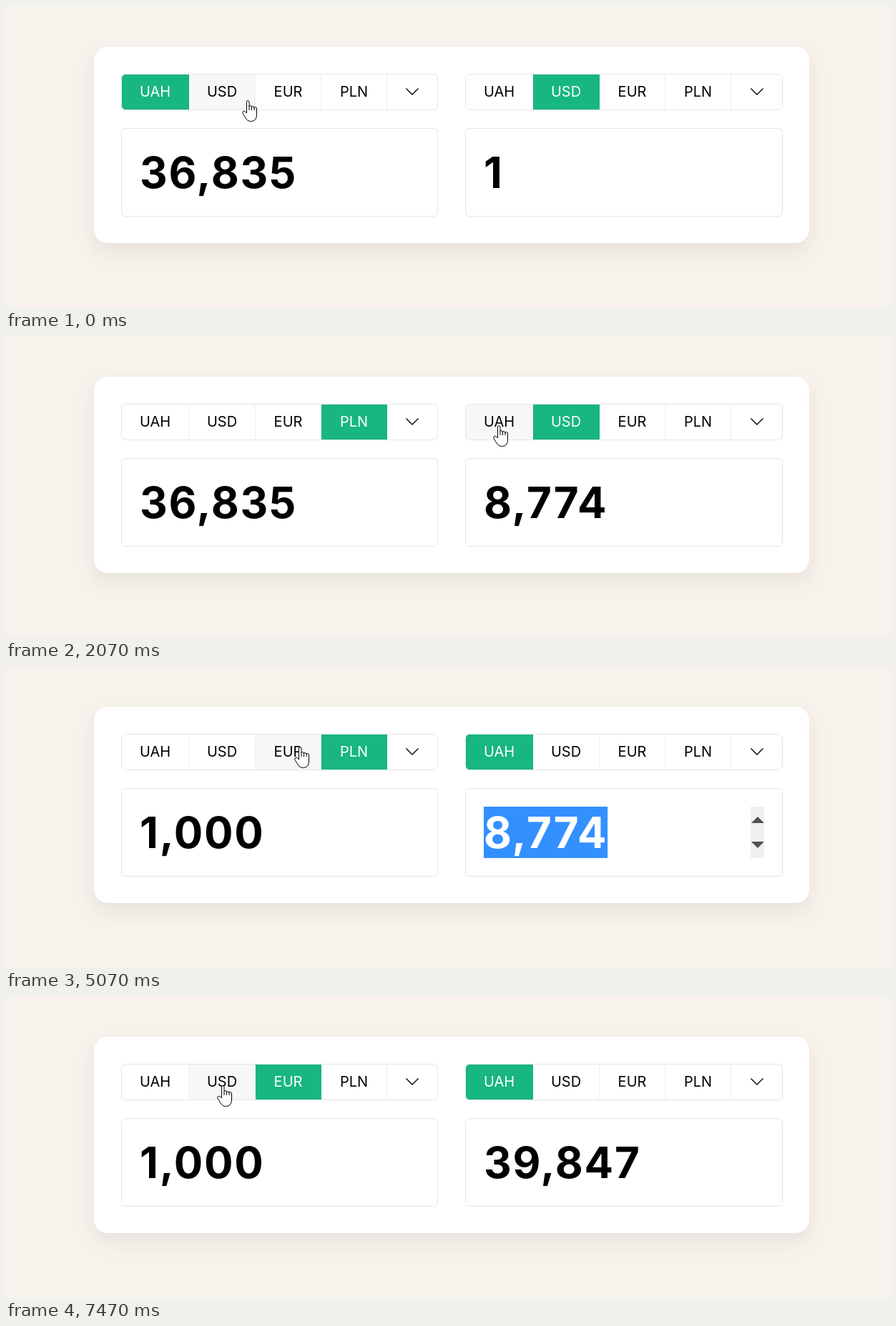
These frames come from a looping animation (1236 px wide and 423 px high, 8 s). An HTML page with a canvas:

```html
<!DOCTYPE html>
<html lang="en">
<head>
<meta charset="utf-8">
<title>Currency converter</title>
<style>
html, body { margin: 0; width: 100%; height: 100%; overflow: hidden; background: #f7f2ec; }
canvas { display: block; }
</style>
</head>
<body>
<canvas id="stage" width="1236" height="423"></canvas>
<script>
const ctx = document.getElementById('stage').getContext('2d');
const LOOP = 8000, TICK = 200 / 3;
const GREEN = '#18b681', LINE = '#e5e5e5', DIVIDER = '#efefef';
const CODES = ['UAH', 'USD', 'EUR', 'PLN'];
const RATES = [1, 36.8355, 39.8469, 8.774];
const CELLS = [94, 93, 92, 92];
const PANELS = [{ x: 161, w: 443 }, { x: 642, w: 444 }];
const BAR = { y: 95, h: 51 }, FIELD = { y: 171, h: 124 };
const DRAG = { from: 4270, to: 6270 };

const CLICKS = [
  { at: 330, panel: 0, code: 1 },
  { at: 930, panel: 0, code: 2 },
  { at: 1400, panel: 0, code: 3 },
  { at: 2130, panel: 1, code: 0 },
  { at: 6270, panel: 0, code: 2 }
];

// pointer moves: start, end, goal x, goal y, downward bow
const START = { x: 337, y: 133 };
const MOVES = [
  [0, 870, 408, 137], [870, 1070, 460, 141], [1070, 1730, 496, 138], [1730, 2070, 688, 126],
  [2070, 2670, 250, 154, 80], [2870, 3270, 794, 242, 40], [3530, 3730, 886, 237],
  [3800, 4000, 886, 235], [4210, 5070, 410, 114], [5200, 5470, 358, 129], [5470, 5800, 428, 114],
  [6000, 6070, 425, 114], [6600, 6930, 289, 140], [6930, 7130, 302, 126]
];

const HAND = new Path2D('M6.5 18V3Q6.5 .5 8.2 .5T10 3V8.5Q10 7.5 11.7 7.5T13.5 10Q13.5 8.5 15.2 8.5T17 11' +
  'Q17 9.5 18.7 9.5T20.5 12V20Q20.5 29.5 12.5 29.5Q7.5 29.5 5 25L1 18.5Q0 15.5 2.5 15.2Q4.5 15.2 6.5 18Z' +
  'M10 8V14M13.5 9V14M17 10V14');
const ARROW = new Path2D('M.5 .5V16.5L4.3 12.9 6.7 18.5 9 17.5 6.6 12H11.8Z');

function pointerAt(t) {
  let { x, y } = START;
  for (const [from, to, goalX, goalY, bow = 0] of MOVES) {
    const u = Math.min(Math.max((t - from) / (to - from), 0), 1);
    const eased = u * u * (3 - 2 * u);
    x += (goalX - x) * eased;
    y += (goalY - y) * eased + bow * Math.sin(Math.PI * u);
  }
  return { x: Math.round(x), y: Math.round(y) };
}

// each click converts the amount of the clicked side into the other, or back
function stateAt(t) {
  const codes = [0, 1], amounts = [36835, 1];
  for (const { at, panel, code } of CLICKS) {
    if (at > t) break;
    codes[panel] = code;
    const from = panel, to = 1 - panel;
    const [source, result] = panel ? [to, from].reverse() : [from, to];
    amounts[result] = Math.round(amounts[source] * RATES[codes[source]] / RATES[codes[result]]);
  }
  return { codes, amounts: amounts.map(n => n.toLocaleString('en-US')) };
}

const inside = (p, panel, row) =>
  p.x >= panel.x && p.x < panel.x + panel.w && p.y >= row.y && p.y < row.y + row.h;

function rect(color, x, y, w, h) {
  ctx.fillStyle = color;
  ctx.fillRect(x, y, w, h);
}

function shape(draw, color, points) {
  ctx.beginPath();
  points.forEach(([x, y]) => ctx.lineTo(x, y));
  ctx[draw + 'Style'] = color;
  ctx[draw]();
}

function text(str, x, y, color) {
  ctx.fillStyle = color;
  ctx.fillText(str, x, y);
}

function box(panel, row) {
  ctx.beginPath();
  ctx.roundRect(panel.x + .5, row.y + .5, panel.w - 1, row.h - 1, 5.5);
}

function drawCard() {
  rect('#f7f2ec', 0, 0, 1236, 423);
  ctx.save();
  ctx.shadowColor = 'rgba(70,40,40,.08)';
  ctx.shadowBlur = 28;
  ctx.shadowOffsetY = 12;
  ctx.fillStyle = '#fff';
  ctx.beginPath();
  ctx.roundRect(123, 57, 1000, 275, 19);
  ctx.fill();
  ctx.restore();
}

function drawBar(panel, chosen, pointer) {
  const over = inside(pointer, panel, BAR);
  const end = panel.x + panel.w - 1;
  let x = panel.x + 1;
  const hover = w => {
    if (over && pointer.x >= x && pointer.x < x + w) rect('#f7f7f7', x, 96, w, 49);
  };
  ctx.save();
  box(panel, BAR);
  ctx.clip();
  ctx.font = '400 20px Inter, sans-serif';
  ctx.letterSpacing = '0px';
  ctx.textAlign = 'center';
  CELLS.forEach((w, i) => {
    hover(w);
    rect(DIVIDER, x + w - 1, 96, 1, 49);
    if (i === chosen) rect(GREEN, x, 96, w, 49);
    text(CODES[i], x + (w - 1) / 2, 127, i === chosen ? '#fff' : '#000');
    x += w;
  });
  hover(end - x);
  ctx.restore();

  ctx.strokeStyle = LINE;
  box(panel, BAR);
  ctx.stroke();
  const mid = end - 35;
  ctx.lineWidth = 1.4;
  shape('stroke', '#000', [[mid - 8.5, 115.5], [mid, 124], [mid + 8.5, 115.5]]);
  ctx.lineWidth = 1;
}

function drawSpinner(x) {
  rect('#f0f0f0', x, 197, 19, 72);
  shape('fill', '#505050', [[x + 1, 220], [x + 10, 211], [x + 19, 220]]);
  shape('fill', '#505050', [[x + 1, 246], [x + 19, 246], [x + 10, 255]]);
}

function drawField(panel, amount, pointer, dragging) {
  ctx.strokeStyle = LINE;
  box(panel, FIELD);
  ctx.stroke();
  if (dragging || inside(pointer, panel, FIELD)) drawSpinner(panel.x + panel.w - 45);

  const x = panel.x + 26;
  ctx.font = '700 60px Inter, sans-serif';
  ctx.letterSpacing = '1.8px';
  text(amount, x, 255, '#000');
  if (!dragging) return;

  const edge = n => x + ctx.measureText(amount.slice(0, n)).width;
  let first = 0;
  while (first < amount.length && (edge(first) + edge(first + 1)) / 2 < pointer.x) first++;
  const start = edge(first), width = edge(amount.length) - start;
  ctx.save();
  ctx.beginPath();
  ctx.rect(start, 197, width, 72);
  ctx.clip();
  rect('#3390ff', start, 197, width, 72);
  text(amount, x, 255, '#fff');
  ctx.restore();
}

function drawOutline(path, x, y) {
  ctx.save();
  ctx.translate(x, y);
  ctx.fillStyle = '#fff';
  ctx.strokeStyle = '#000';
  ctx.fill(path);
  ctx.stroke(path);
  ctx.restore();
}

function drawBeam(x, y) {
  rect('#000', x - 1, y - 9, 2, 18);
  for (const top of [y - 10, y + 9]) {
    rect('#000', x - 4, top, 3, 1);
    rect('#000', x + 1, top, 3, 1);
  }
}

function drawPointer(p) {
  const over = row => PANELS.some(panel => inside(p, panel, row));
  if (over(BAR)) drawOutline(HAND, p.x - 7, p.y - 1);
  else if (over(FIELD)) drawBeam(p.x, p.y);
  else drawOutline(ARROW, p.x, p.y);
}

function frame(now) {
  // time advances in fixed ticks
  const t = Math.floor((now % LOOP + 4) / TICK) * TICK + 4;
  const pointer = pointerAt(t);
  const { codes, amounts } = stateAt(t);
  const dragging = t >= DRAG.from && t < DRAG.to;
  drawCard();
  PANELS.forEach((panel, i) => {
    drawBar(panel, codes[i], pointer);
    drawField(panel, amounts[i], pointer, i === 1 && dragging);
  });
  drawPointer(pointer);
  requestAnimationFrame(frame);
}
requestAnimationFrame(frame);
</script>
</body>
</html>
```
